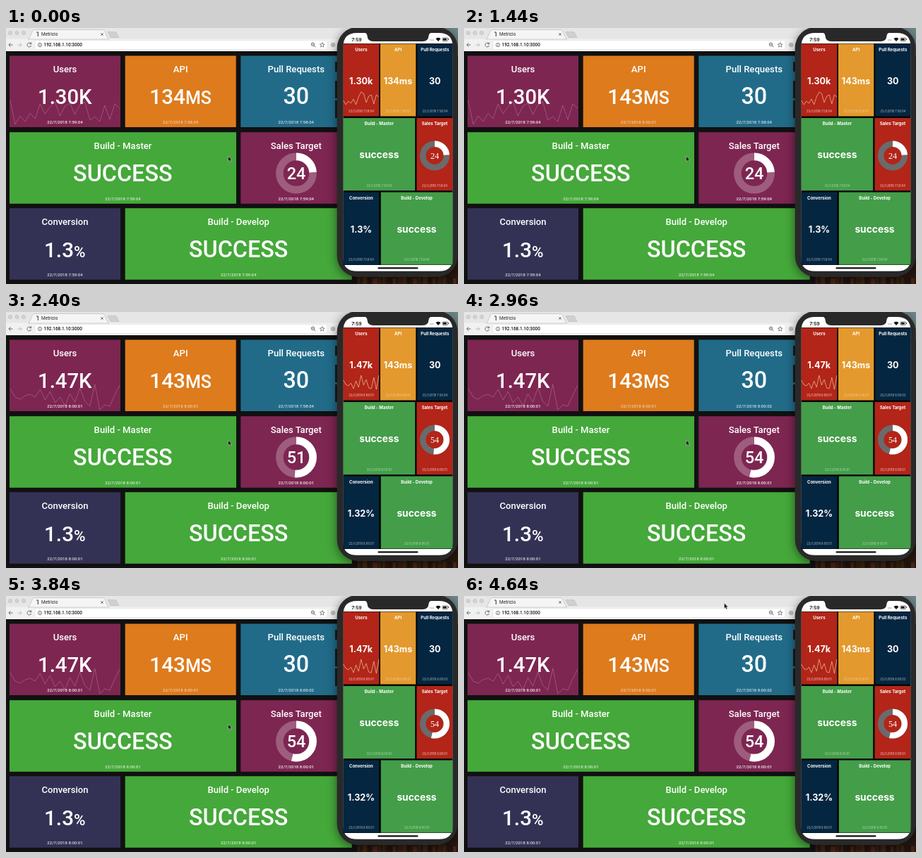
Animation, 640 px wide and 364 px high, one loop 4720 ms. Source, as an HTML page:

```html
<!DOCTYPE html>
<html lang="en">
<head>
<meta charset="utf-8">
<title>Dashboard</title>
<style>
html, body { margin: 0; width: 100%; height: 100%; overflow: hidden; background: #111; }
svg { display: block; width: 640px; height: 364px; }
.web { font-family: Roboto, sans-serif; font-weight: 500; fill: #fff; text-anchor: middle; }
.app { font-family: Inter, sans-serif; font-weight: 700; fill: #fff; text-anchor: middle; }
.bar { font: 6.4px Roboto, sans-serif; fill: #222; }
#body { filter: drop-shadow(0 3px 7px rgba(0, 0, 0, .5)); }
</style>
</head>
<body>
<svg id="stage" viewBox="0 0 640 364">
  <rect width="640" height="364" fill="#111"/>
  <g id="wall"></g>
  <g id="chrome">
    <rect width="497" height="16" fill="#e6e6e6"/>
    <rect y="15.5" width="497" height="17.5" fill="#f1f1f1"/>
    <path d="M31 16C35 15 36 3 40 2.5H137C141 3 142 15 146 16Z" fill="#f5f5f5" stroke="#b5b5b5" stroke-width=".6"/>
    <path d="M144 5.5H156L160 13.5H148Z" fill="#d0d0d0" stroke="#b5b5b5" stroke-width=".5"/>
    <g fill="#d2d2d2" stroke="#b8b8b8" stroke-width=".5">
      <circle cx="6" cy="7" r="2.7"/><circle cx="15.5" cy="7" r="2.7"/><circle cx="25" cy="7" r="2.7"/>
    </g>
    <path d="M43 6H45.3V12" fill="none" stroke="#333" stroke-width="1"/>
    <text class="bar" x="50" y="11">Metricio</text>
    <path d="M134.3 7.3l3.4 3.4m0-3.4l-3.4 3.4" stroke="#444" stroke-width=".8"/>
    <rect x="41" y="17.5" width="414" height="13" rx="2" fill="#fff" stroke="#ddd" stroke-width=".6"/>
    <g fill="none" stroke="#666" stroke-width="1">
      <path d="M9.5 24H4M6.5 21.3L3.8 24L6.5 26.7"/>
      <path d="M16.5 24H22M19.5 21.3L22.2 24L19.5 26.7" stroke="#bbb"/>
      <path d="M35 22A2.9 2.9 0 1 0 35.6 25M35.7 20.5V22.8H33.4"/>
      <circle cx="48" cy="24" r="2.7" stroke-width=".8"/><path d="M48 23.5V25.6M48 22.2V22.9"/>
      <circle cx="434.5" cy="23.3" r="2.2"/><path d="M436.2 25L438.4 27.2M433.5 23.3H435.5"/>
      <path d="M447.7 20.6L448.6 23L451.1 23.1L449.1 24.7L449.8 27.1L447.7 25.7L445.6 27.1L446.3 24.7L444.3 23.1L446.8 23Z" stroke-width=".8"/>
    </g>
    <circle cx="463" cy="24" r="3.2" fill="#bbb"/>
    <text class="bar" x="53.6" y="26.2" style="fill:#111;font-weight:500">192.168.1.10:3000</text>
  </g>
  <g id="web" class="web"></g>
  <g id="phone">
    <path d="M466 48h5v14h-5zM466 75h5v25h-5zM466 103h5v25h-5z" fill="#181818"/>
    <rect id="body" x="468.7" y="-1.5" width="171" height="355.5" rx="30" fill="#292929"/>
    <path d="M477.6 26Q477.6 7 497 7H613Q632.4 7 632.4 26V328Q632.4 345.8 613 345.8H497Q477.6 345.8 477.6 328Z" fill="#fff"/>
    <path d="M507 6.5Q511 7 511.5 11Q512 19 520 19H590Q598 19 598.5 11Q599 7 603 6.5Z" fill="#292929"/>
    <rect x="477.6" y="22" width="154.8" height="315" fill="#050505"/>
    <rect x="526.5" y="340.2" width="57" height="2.3" rx="1.1" fill="#111"/>
    <text class="app" x="496.5" y="18.8" font-size="6.8" style="fill:#111;font-weight:600">7:59</text>
    <g fill="#111">
      <circle cx="601" cy="17" r=".5"/><circle cx="603" cy="17" r=".5"/><circle cx="605" cy="17" r=".5"/>
      <path d="M612 19L608.5 15.3Q612 12.4 615.5 15.3Z"/>
      <rect x="618" y="14" width="7.5" height="4.4" rx="1" fill="none" stroke="#111" stroke-width=".6"/>
      <rect x="618.9" y="14.9" width="4.9" height="2.6"/><rect x="626.2" y="15.3" width=".7" height="1.8"/>
    </g>
  </g>
  <g id="app" class="app"></g>
  <path id="cursor" d="M0 0V7.6L1.8 6L3 8.7L4.3 8.1L3.1 5.5H5.5Z" fill="#111" stroke="#ddd" stroke-width=".5"/>
</svg>
<script>
const LOOP = 4720;
const API_AT = 1300, MAIN_AT = 2000, PULLS_AT = 2700;
const $ = id => document.getElementById(id);
const web = $('web'), app = $('app');
const clamp = v => Math.max(0, Math.min(1, v));

function add(parent, tag, attrs, text) {
  const el = document.createElementNS('http://www.w3.org/2000/svg', tag);
  for (const k in attrs) el.setAttribute(k, attrs[k]);
  if (text) el.textContent = text;
  parent.append(el);
  return el;
}

function label(parent, x, y, size, text, opacity = 1) {
  return add(parent, 'text', { x, y, 'font-size': size, 'fill-opacity': opacity }, text);
}

function setText(el, text) {
  if (el.textContent !== text) el.textContent = text;
}

function tile(parent, x, y, w, h, fill, title, stampFade) {
  const big = parent === web, cx = x + w / 2;
  add(parent, 'rect', { x, y, width: w, height: h, fill });
  label(parent, cx, y + (big ? 23.6 : 10.2), big ? 13.1 : 6.05, title);
  const stamp = label(parent, cx, y + h - (big ? 4.6 : 5.5), big ? 6 : 4.15, '', stampFade);
  stamp.style.fontWeight = big ? 500 : 400;
  return stamp;
}

function ring(parent, cx, cy, r, width, back) {
  const base = { cx, cy, r, fill: 'none', 'stroke-width': width };
  add(parent, 'circle', { ...base, stroke: back });
  return add(parent, 'circle', {
    ...base, stroke: '#fff', pathLength: 100, transform: `rotate(-90 ${cx} ${cy})`
  });
}

function spark(parent, x, w, ys, stroke, width) {
  const points = ys.map((y, i) => `${x + w * i / (ys.length - 1)},${y}`).join(' ');
  return add(parent, 'polyline', { points, fill: 'none', stroke, 'stroke-width': width, 'stroke-linejoin': 'round' });
}

function number(parent, x, y, size, text, unit, unitSize) {
  const el = label(parent, x, y, size);
  const main = add(el, 'tspan', {}, text);
  if (unit) add(el, 'tspan', { 'font-size': unitSize }, unit);
  return main;
}

// wallpaper below the phone
add($('wall'), 'rect', { x: 497, y: 0, width: 143, height: 364, fill: '#27170f' });
add($('wall'), 'rect', { x: 600, y: 0, width: 40, height: 40, fill: '#6f878a' });
const browns = ['#33200f', '#4a2416', '#20140e', '#3c2512'];
for (let i = 0; i < 20; i++) {
  add($('wall'), 'rect', { x: 498 + i * 7.1, y: 353 + i * 5 % 4, width: 3 + i * 3 % 5, height: 11, fill: browns[i * 7 % 4] });
}

const PLUM = '#7d2651', GREEN = '#45a83a', RED = '#b22518', NAVY = '#052640', LEAF = '#449d49';

const webStamps = {
  users: tile(web, 5, 39.5, 157, 101.5, PLUM, 'Users', .9),
  api: tile(web, 168.7, 39.5, 157, 101.5, '#de7b1c', 'API', .6),
  pulls: tile(web, 332.3, 39.5, 157, 101.5, '#216b89', 'Pull Requests', .8),
  master: tile(web, 5, 148.2, 321, 101.6, GREEN, 'Build - Master', .75),
  sales: tile(web, 332.3, 148.2, 157, 101.6, PLUM, 'Sales Target', .9),
  conv: tile(web, 5, 256.2, 157, 101.6, '#343254', 'Conversion', .8),
  dev: tile(web, 168.7, 256.2, 321, 101.6, GREEN, 'Build - Develop', .75)
};
const appStamps = {
  users: tile(app, 477.6, 22.5, 50.6, 103, RED, 'Users', .8),
  api: tile(app, 530, 22.5, 50.3, 103, '#e3992d', 'API', .5),
  pulls: tile(app, 582.3, 22.5, 50.1, 103, NAVY, 'Pull Requests', .7),
  master: tile(app, 477.6, 128, 101.6, 103.2, LEAF, 'Build - Master', .6),
  sales: tile(app, 581.5, 128, 50.9, 103.2, RED, 'Sales Target', .8),
  conv: tile(app, 477.6, 233.5, 50.6, 103, NAVY, 'Conversion', .7),
  dev: tile(app, 530.8, 233.5, 101.6, 103, LEAF, 'Build - Develop', .6)
};

const webLines = [
  [103, 137, 125, 133, 121, 129, 108, 122, 112, 105, 125, 111, 107, 123, 109, 105, 131, 126, 133, 110, 130, 108, 114],
  [109, 121, 124, 119, 117, 121, 110, 125, 113, 129, 121, 133, 116, 128, 108, 127, 134, 103, 139, 132, 134, 118, 104]
].map(ys => spark(web, 6, 155, ys, 'rgba(255,220,240,.3)', .8));
const appLines = [
  [103, 109, 104, 107, 101, 109, 98, 91, 93, 106, 97, 95, 108, 95, 98],
  [97, 103, 105, 101, 109, 98, 107, 90, 104, 96, 108, 109, 93, 110, 90]
].map(ys => spark(app, 477.6, 50.4, ys, '#e8c7a0', .7));

const webUsers = number(web, 83.3, 107.8, 29.3, '1.30K');
const webApi = number(web, 247.1, 107.8, 29.7, '134', 'MS', 25);
number(web, 410.8, 107.8, 32.3, '30');
number(web, 165.3, 218, 32.4, 'SUCCESS');
number(web, 83.3, 325.6, 29.7, '1.3', '%', 22.5);
number(web, 329.2, 326, 32.4, 'SUCCESS');
const webArc = ring(web, 411, 206.5, 23.6, 10.6, 'rgba(255,255,255,.25)');
const webSales = number(web, 411, 214.6, 23.5, '24');

const appUsers = number(app, 502.7, 79.8, 12.6, '1.30k');
const appApi = number(app, 555, 79.8, 12.5, '134ms');
number(app, 607.3, 79.8, 12.6, '30');
number(app, 528.3, 185.4, 13.8, 'success');
const appConv = number(app, 503, 291, 12.7, '1.3%');
number(app, 581.5, 291, 13.8, 'success');
const appArc = ring(app, 607, 181.5, 16.8, 8.5, '#6b6a6c');
const appSales = number(app, 607, 185.6, 12.2, '24');
appSales.parentNode.style.cssText = 'font-family:"Liberation Serif",serif;font-weight:400';

// stamps come above the charts
for (const set of [webStamps, appStamps]) {
  for (const key in set) set[key].parentNode.append(set[key]);
}

function render(t) {
  const apiNew = t >= API_AT, mainNew = t >= MAIN_AT;
  const times = {
    api: apiNew ? '8:00:01' : '7:58:05',
    pulls: t >= PULLS_AT ? '8:00:02' : '7:58:04'
  };
  for (const set of [webStamps, appStamps]) {
    for (const key in set) {
      setText(set[key], '22/7/2018 ' + (times[key] || (mainNew ? '8:00:01' : '7:59:04')));
    }
  }
  setText(webApi, apiNew ? '143' : '134');
  setText(appApi, apiNew ? '143ms' : '134ms');
  setText(webUsers, mainNew ? '1.47K' : '1.30K');
  setText(appUsers, mainNew ? '1.47k' : '1.30k');
  setText(appConv, mainNew ? '1.32%' : '1.3%');
  for (const lines of [webLines, appLines]) {
    lines.forEach((line, i) => { line.style.display = i === +mainNew ? '' : 'none'; });
  }

  const count = 24 + 30 * clamp((t - MAIN_AT) / 440);
  setText(webSales, String(Math.floor(count)));
  setText(appSales, mainNew ? '54' : '24');
  for (const arc of [webArc, appArc]) arc.setAttribute('stroke-dasharray', `${count} 100`);

  const k = clamp((t - 4000) / 560), e = k * k * (3 - 2 * k);
  $('cursor').setAttribute('transform', `translate(${314.5 + 54 * e} ${182.2 - 172 * e})`);
}

const start = performance.now();
function frame() {
  render((performance.now() - start) % LOOP);
  requestAnimationFrame(frame);
}
render(0);
requestAnimationFrame(frame);
</script>
</body>
</html>
```
